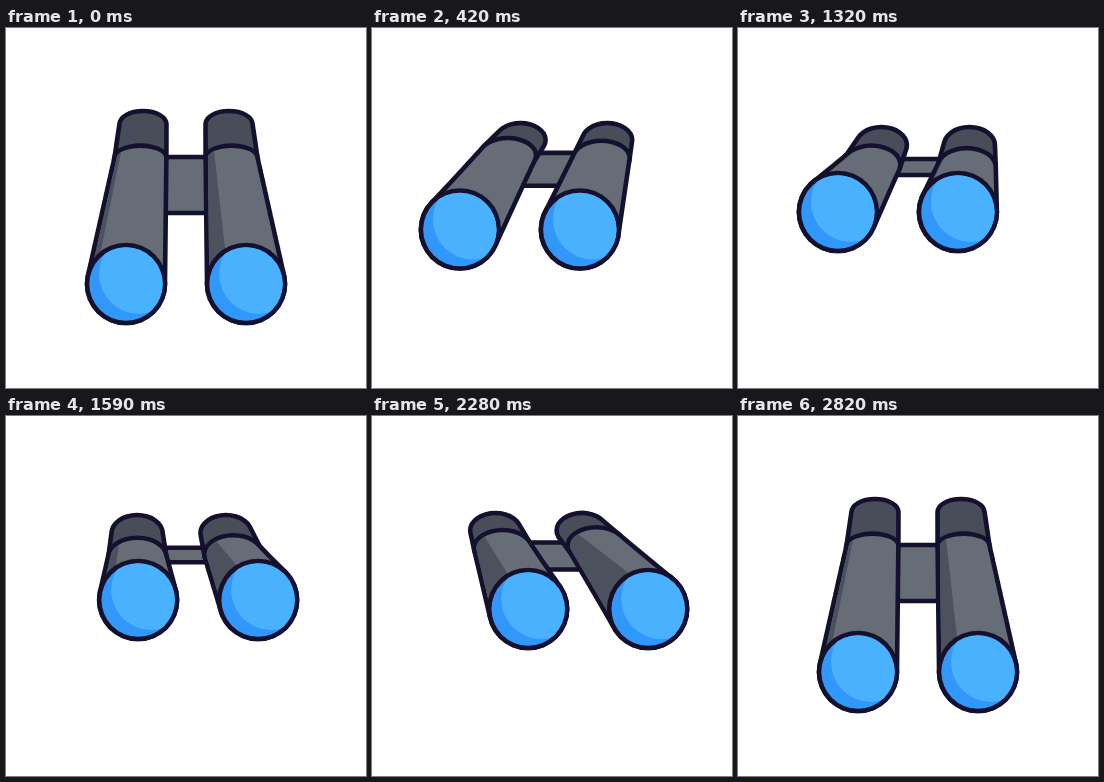
Recreate the animation shown at these times as an HTML page with a canvas. Size 360 by 360 pixels, loop 2850 ms.

```html
<!DOCTYPE html>
<html lang="en">
<head>
<meta charset="utf-8">
<title>Binoculars</title>
<style>
html, body { margin: 0; width: 100%; height: 100%; overflow: hidden; background: #fff; }
canvas { display: block; width: 100vmin; height: 100vmin; }
</style>
</head>
<body>
<canvas id="stage" width="360" height="360"></canvas>
<script>
const ctx = document.getElementById('stage').getContext('2d');
const LOOP = 2850, STEP = 30;
const HALF = 2.3; // half the outline width
const INK = '#13112d', BODY = '#666d76', SHADE = '#4c525d', CAP = '#484d59';
const GLASS = '#4ab1ff', GLASS_SHADE = '#3097fb';

const mix = (a, b, u) => a + (b - a) * u;

function ease(t, from, to) {
  const u = Math.min(1, Math.max(0, (t - from) / (to - from)));
  return u * u * (3 - 2 * u);
}

function fill(path, color) {
  ctx.fillStyle = color;
  ctx.fill(path);
}

function addEllipse(path, x, y, rx, ry) {
  path.moveTo(x + rx, y);
  path.ellipse(x, y, rx, ry, 0, 0, 2 * Math.PI);
}

// Tube between two ellipses, grown or shrunk by d
function tube(a, b, d) {
  const path = new Path2D(), n = 90;
  for (let i = 0; i <= n; i++) {
    const u = i / n;
    addEllipse(path, mix(a.x, b.x, u), mix(a.y, b.y, u),
      mix(a.rx, b.rx, u) + d, mix(a.ry, b.ry, u) + d);
  }
  return path;
}

function disc(x, y, r) {
  const path = new Path2D();
  addEllipse(path, x, y, r, r);
  return path;
}

function clipped(path, draw) {
  ctx.save();
  ctx.clip(path);
  draw();
  ctx.restore();
}

function barrel(x, y, eyeX, k, drop) {
  const lean = x - eyeX;
  const lens = { x, y, rx: 39, ry: 39 };
  const eye = { x: eyeX, rx: 23.5 + 2 * k, ry: 13 + 5 * k };
  eye.y = 83 + 16 * k + eye.ry;
  const ring = { x: mix(eyeX, x, 0.15 + 0.08 * k), rx: 26 + 3 * k, ry: 12 + 7 * k };
  ring.y = 119 - 0.08 * Math.abs(lean) + drop + ring.ry;

  fill(tube(eye, ring, HALF), INK);
  fill(tube(eye, ring, -HALF), CAP);

  const inside = tube(ring, lens, -HALF);
  fill(tube(ring, lens, HALF), INK);
  fill(inside, BODY);
  clipped(inside, () => {
    const topX = ring.x - 0.6 * ring.rx - 0.15 * Math.abs(lean), topY = ring.y - ring.ry;
    const endX = x - 23 + 0.15 * lean, endY = y - 31;
    const shadow = new Path2D();
    shadow.moveTo(topX, topY);
    shadow.lineTo(endX, endY);
    shadow.lineTo(endX, y + 40);
    shadow.lineTo(endX - 200, y + 40);
    shadow.lineTo(topX - 200, topY);
    fill(shadow, SHADE);
  });

  const glass = disc(x, y, 39 - HALF);
  fill(disc(x, y, 39 + HALF), INK);
  fill(glass, GLASS_SHADE);
  clipped(glass, () => fill(disc(x + 13, y - 10, 40), GLASS));
}

function bridge(x, k, drop) {
  const top = 129 + drop, bottom = 185 - 36 * k - Math.max(0, drop);
  ctx.fillStyle = BODY;
  ctx.strokeStyle = INK;
  ctx.lineWidth = 2 * HALF;
  ctx.beginPath();
  ctx.rect(145, top, 70, bottom - top);
  ctx.fill();
  ctx.stroke();
  if (x < 82 && k > 0.95) fill(new Path2D('M172 137l2-2h4l2 2-4 4z'), '#fff');
}

function render(t) {
  const x = 120 - 41 * ease(t, 0, 600) + 82 * ease(t, 990, 1990) - 41 * ease(t, 2190, 2610);
  // k: 0 is pointing down, 1 is raised
  const k = -0.055 * ease(t, 0, 110) + 1.055 * ease(t, 110, 560)
    - 1.058 * ease(t, 2190, 2610) + 0.058 * ease(t, 2610, 2820);
  const y = 256 - 72 * k, drift = 0.37 * (x - 120);
  // flat: raised and facing the viewer
  const flat = k * (1 - Math.abs(x - 120) / 41);
  const drop = 4 * flat - 26 * Math.max(0, k * (1 - k));
  ctx.fillStyle = '#fff';
  ctx.fillRect(0, 0, 360, 360);
  bridge(x, k, drop);
  barrel(x, y, 137 - drift - 2 * flat, k, drop);
  barrel(x + 120, y, 223 - drift + 2 * flat, k, drop);
}

const start = performance.now();
function frame() {
  const t = (performance.now() - start) % LOOP;
  render(t - t % STEP);
  requestAnimationFrame(frame);
}
frame();
</script>
</body>
</html>
```
